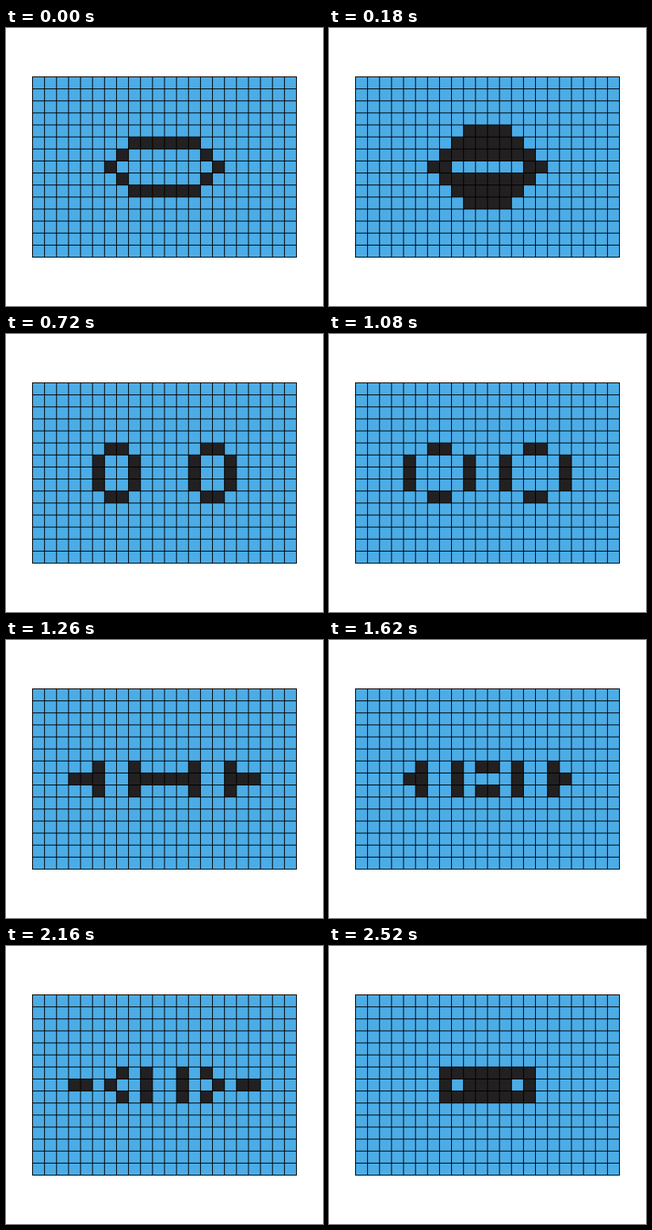
Recreate the animation shown at these times as an HTML page. Size 400 by 350 pixels, loop 2700 ms.

```html
<!DOCTYPE html>
<html lang="en">
<head>
<meta charset="utf-8">
<title>Game of Life oscillator</title>
<style>
  html, body { margin: 0; width: 100%; height: 100%; overflow: hidden; background: #fff; }
  svg { display: block; }
</style>
</head>
<body>
<svg width="400" height="350" viewBox="0 0 400 350">
  <rect x="33.5" y="61.5" width="333" height="227" fill="#4cace6"/>
  <path id="cells" fill="#222021"/>
  <path id="grid" fill="none" stroke="#000" stroke-linecap="square"/>
</svg>
<script>
const COLS = 22, ROWS = 15;
const LEFT = 33.5, TOP = 61.5, WIDTH = 333, HEIGHT = 227;
const STEP = 180, PERIOD = 15;

const colX = c => LEFT + c * WIDTH / COLS;
const rowY = r => TOP + r * HEIGHT / ROWS;
const range = n => Array.from({ length: n }, (_, i) => i);

const seed = [
  '  ######  ',
  ' #      # ',
  '#        #',
  ' #      # ',
  '  ######  '
];
const SEED_COL = 6, SEED_ROW = 5;

const first = range(ROWS).map(r => range(COLS).map(c =>
  (seed[r - SEED_ROW] || '')[c - SEED_COL] === '#'));

function nextGeneration(board) {
  const alive = (r, c) => board[r] && board[r][c] ? 1 : 0;
  return board.map((row, r) => row.map((cell, c) => {
    let neighbours = -alive(r, c);
    for (let dr = -1; dr <= 1; dr++)
      for (let dc = -1; dc <= 1; dc++) neighbours += alive(r + dr, c + dc);
    return neighbours === 3 || (cell && neighbours === 2);
  }));
}

function boardPath(board) {
  let d = '';
  board.forEach((row, r) => row.forEach((cell, c) => {
    if (cell) d += `M${colX(c)} ${rowY(r)}H${colX(c + 1)}V${rowY(r + 1)}H${colX(c)}Z`;
  }));
  return d;
}

const paths = [];
for (let board = first; paths.length < PERIOD; board = nextGeneration(board))
  paths.push(boardPath(board));

document.getElementById('grid').setAttribute('d',
  range(COLS + 1).map(c => `M${colX(c)} ${TOP}v${HEIGHT}`).join('') +
  range(ROWS + 1).map(r => `M${LEFT} ${rowY(r)}h${WIDTH}`).join(''));

const cells = document.getElementById('cells');

function render(time) {
  cells.setAttribute('d', paths[Math.floor(time / STEP) % PERIOD]);
}

const start = performance.now();
function tick() {
  render(performance.now() - start);
  requestAnimationFrame(tick);
}
tick();
</script>
</body>
</html>
```
